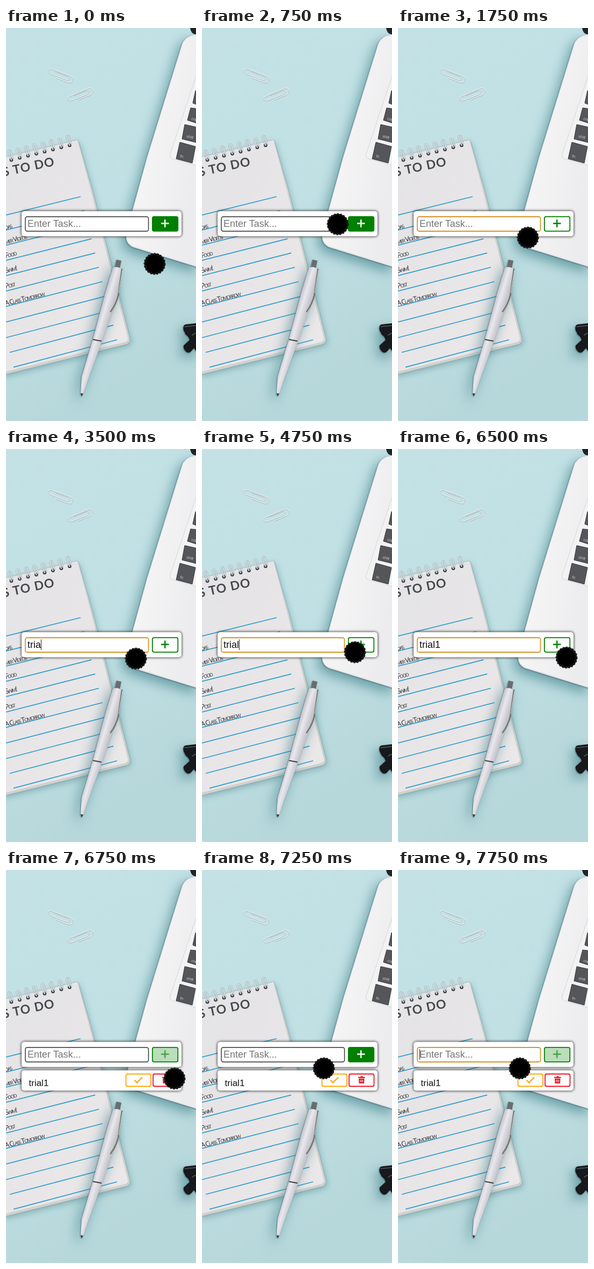
An HTML page that plays this animation: 354x733 px, repeating every 8 s.

```html
<!DOCTYPE html>
<html lang="en">
<head>
<meta charset="utf-8">
<title>To-do list</title>
<style>
  html, body { margin: 0; height: 100%; overflow: hidden; background: #c1e0e4; }
  svg { display: block; width: 100%; height: 100%; font-family: "Liberation Sans", Arial, sans-serif; }
  .soft { filter: drop-shadow(0 0 1px #4d7178aa) drop-shadow(2px 4px 6px #4a858c77); }
  .deep { filter: drop-shadow(-1px 1px 1px #48686fcc) drop-shadow(-7px 9px 11px #3f7f8aaa); }
  .card { fill: #fff; filter: drop-shadow(0 0 2.5px #000); }
  .line { fill: none; stroke-linecap: round; stroke-linejoin: round; }
  .note { font: 13px "Open Sans", sans-serif; font-variant: small-caps; letter-spacing: -1.5px; fill: #2c2c2e; }
  .key { fill: #55565a; stroke: #37383b; stroke-linejoin: round; }
  .label { font-size: 7px; fill: #d0d0d2; }
</style>
</head>
<body>
<svg viewBox="0 0 354 733">
  <defs>
    <linearGradient id="desk" x2=".3" y2="1">
      <stop stop-color="#c4e2e6"/><stop offset=".55" stop-color="#c0e0e4"/><stop offset="1" stop-color="#b7d8db"/>
    </linearGradient>
    <linearGradient id="metal" x2="1" y2=".5">
      <stop stop-color="#fafafa"/><stop offset="1" stop-color="#ececee"/>
    </linearGradient>
    <linearGradient id="paper" x2="1" y2="1">
      <stop stop-color="#e4e3e5"/><stop offset="1" stop-color="#ebe8e9"/>
    </linearGradient>
    <linearGradient id="barrel" gradientUnits="userSpaceOnUse" x1="179" y1="513" x2="199" y2="519">
      <stop stop-color="#c3c3ca"/><stop offset=".4" stop-color="#e9e8ee"/><stop offset="1" stop-color="#c4c3ca"/>
    </linearGradient>
  </defs>

  <rect width="354" height="733" fill="url(#desk)"/>
  <path d="M343 0Q345 12 354 12V0Z" fill="#202326"/>

  <!-- laptop -->
  <path class="deep" d="M360 12Q335 12 328 30L318 62L263 240L224 382Q221 402 237 409L360 447Z" fill="#e3e5e7"/>
  <path d="M360 13Q336 13 329 31L319 63L264 241L225 381Q222 400 238 407L360 445Z" fill="url(#metal)"/>
  <path d="M360 72L306 235Q304 242 311 244L360 258Z" fill="#f2f2f3" stroke="#d5d5d8"/>
  <path class="key" d="M360 117L353 117L348 140L360 145ZM360 151L344 149L338 172L360 179ZM360 186L333 180L328 207L360 215ZM324 213L353 221L347 252L317 244Z"/>
  <g class="label">
    <text transform="translate(345 171) rotate(14)">cops</text>
    <text transform="translate(336 204) rotate(14)">shift</text>
    <text transform="translate(324 241) rotate(14)">fn</text>
  </g>

  <!-- paper clips -->
  <g class="line" stroke="#eef3f4" stroke-width="2">
    <path id="clip" d="M92 81L116 90Q121 93 118 96Q115 98 110 96L84 86Q77 82 79 78Q82 75 88 78L121 90Q127 94 124 100Q121 103 114 101L93 93"/>
    <use href="#clip" transform="translate(139 125) rotate(-43) translate(-102 -89)"/>
    <g stroke="#98a7ad" stroke-width=".9">
      <use href="#clip" y=".6"/>
      <use href="#clip" transform="translate(139 125.6) rotate(-43) translate(-102 -89)"/>
    </g>
  </g>

  <!-- notepad -->
  <path class="soft" d="M-5 242L134 209L161 303L231 580Q231 588 224 590L-5 647Z" fill="#d0d0cd"/>
  <path d="M-5 242L133 209L158 303L227 578Q228 584 221 586L-5 642Z" fill="url(#paper)"/>
  <g id="coils" class="line"></g>
  <g id="rules" stroke="#2b9bc9" stroke-width="1.7"></g>
  <text transform="translate(-5 277) rotate(-12)" font-family="Lato, sans-serif" font-size="23" font-weight="700" letter-spacing="1.2" fill="#47484b">S TO DO</text>
  <g id="notes" class="note"></g>

  <!-- pen -->
  <g class="deep">
    <path d="M206 432L215 434L212 448L203 446Z" fill="#6a6c6e"/>
    <path d="M199 447Q208 443 217 451L207 505L177 590L153 655L143 685L139 683L141 650L162 580L186 490Z" fill="url(#barrel)"/>
    <path d="M139 681L144 682L141 687Z" fill="#333"/>
    <path d="M162 581L178 584" stroke="#3c3e42" stroke-width="2.2"/>
    <path class="line" d="M216 450L209 499Q205 515 195 529" stroke="#74766f" stroke-width="2.6"/>
    <path class="line" d="M217 452L210 494" stroke="#d7d7d2"/>
  </g>

  <!-- glasses -->
  <path class="deep" d="M360 550L334 553Q329 555 331 564L335 572Q341 576 342 582L331 592Q330 599 336 604Q341 608 346 602L350 597L360 609Z" fill="#17191c"/>
  <path class="line" d="M347 573Q351 569 356 569M333 557L354 555" stroke="#555c62" stroke-width="1.5"/>

  <!-- entry form -->
  <g id="form">
    <rect class="card" x="29" y="341.5" width="298" height="47" rx="5"/>
    <rect id="field" x="36" y="352" width="229.5" height="27" rx="3.5" fill="#fff"/>
    <text id="entry" x="40" y="371" font-size="18"></text>
    <path id="caret" d="M.5 355V375" stroke="#222"/>
    <rect id="add" x="272.8" y="351.8" width="47.5" height="27" rx="3" fill="green" stroke="green" stroke-width="1.8"/>
    <path id="plus" d="M289 364.5H303.5M296.2 357.2V371.8" stroke-width="2.4"/>
  </g>

  <!-- added task -->
  <g id="task">
    <rect class="card" x="29" y="373.5" width="298" height="38" rx="5"/>
    <text x="42.5" y="402.5" font-size="17" fill="#111">trial1</text>
    <g fill="none" stroke-width="1.8">
      <rect x="223.5" y="380.5" width="46.5" height="23" rx="3" stroke="orange"/>
      <path d="M239.5 392L244 396.5L254 386.5" stroke="orange" stroke-width="2.4"/>
      <rect x="274" y="380.5" width="46.5" height="23" rx="3" stroke="#f01020"/>
    </g>
    <path d="M291 386H295L296 384.5H299L300 386H303.5V388H291ZM292 389H302.5L302 398H292.5Z" fill="#e31222"/>
    <path d="M295 391V396M297.3 391V396M299.6 391V396" stroke="#fff" stroke-width=".9"/>
  </g>

  <g id="pointer">
    <circle r="19.5" fill="#141414" stroke="#1c1c1c" stroke-width="2" stroke-dasharray="3 3"/>
    <circle r="16.5"/>
  </g>
</svg>
<script>
const $ = id => document.getElementById(id);
const LOOP = 8000, STEP = 250;

let coils = '', rules = '', notes = '';
for (let i = -1; i < 8; i++) {
  const x = 10 + i * 15.5, y = 246 - i * 3.9;
  const loop = `M${x} ${y}L${x - 6} ${y - 14}Q${x - 5} ${y - 20} ${x - 1} ${y - 16}L${x + 3} ${y - 2}`;
  coils += `<circle cx="${x}" cy="${y}" r="3.4" fill="#3c4144"/>
    <path d="${loop}" stroke="#87949a" stroke-width="2.6"/><path d="${loop}" stroke="#f0f3f3" stroke-width="1.4"/>`;
}
for (let i = 0; i < 11; i++) {
  const x = 139 + 6.8 * i, y = 314.5 + 26 * i + .07 * i * i, left = Math.max(-2, 7 * i - 56);
  rules += `<path d="M${left} ${y + (x - left) * (.247 + .0018 * i)}L${x} ${y}"/>`;
}
[['das', 376], ['mer Videos', 403], ['Food', 429], ['Swim!', 457], ['Post', 486], ['A Class Tomorrow', 518]]
  .forEach(([text, y]) => notes += `<text transform="translate(-1 ${y}) rotate(-14)">${text}</text>`);
$('coils').innerHTML = coils;
$('rules').innerHTML = rules;
$('notes').innerHTML = notes;

// Each entry is [first step, value]; the value holds until the next entry.
const pointer = [[0, [277, 440]], [1, [279, 444]], [2, [268, 412]], [3, [253, 366]], [4, [246, 357]],
  [5, [242, 391]], [19, [285, 379]], [20, [304, 397]], [21, [314, 389]], [28, [262, 384]], [29, [227, 370]]];
const typed = [[0, ''], [10, 't'], [11, 'tr'], [12, 'tri'], [14, 'tria'], [15, 'trial'], [23, 'trial1'], [27, '']];
const caretOn = [[0, 0], [5, 1], [7, 0], [9, 1], [17, 0], [19, 1], [21, 0], [23, 1], [25, 0], [31, 1]];
const focus = [[0, 0], [5, 1], [27, 0], [30, 1]];
const solid = [[0, 1], [5, .7], [6, .27], [7, 0], [27, .27], [28, .7], [29, 1], [30, .7], [31, .27]];
const at = (track, step) => track.findLast(entry => entry[0] <= step)[1];

function draw(now) {
  const step = Math.floor(now % LOOP / STEP);
  const text = at(typed, step), fill = at(solid, step), focused = at(focus, step), added = step >= 27;
  $('form').setAttribute('transform', `translate(0 ${added ? -21 : 0})`);
  $('task').style.display = added ? '' : 'none';
  $('field').setAttribute('stroke', focused ? '#d6942b' : '#2b2b2b');
  $('field').setAttribute('stroke-width', focused ? 1.8 : 1.4);
  $('entry').textContent = text || 'Enter Task...';
  $('entry').setAttribute('fill', text ? '#111' : '#757575');
  const end = text ? $('entry').getComputedTextLength() : 0;
  $('caret').setAttribute('transform', `translate(${40 + Math.round(end)} 0)`);
  $('caret').style.display = at(caretOn, step) ? '' : 'none';
  $('add').setAttribute('fill-opacity', fill);
  $('plus').setAttribute('stroke', `rgb(${255 * fill},${128 + 127 * fill},${255 * fill})`);
  $('pointer').setAttribute('transform', `translate(${at(pointer, step)})`);
}

const start = performance.now();
function tick() {
  draw(performance.now() - start);
  requestAnimationFrame(tick);
}
tick();
</script>
</body>
</html>
```
